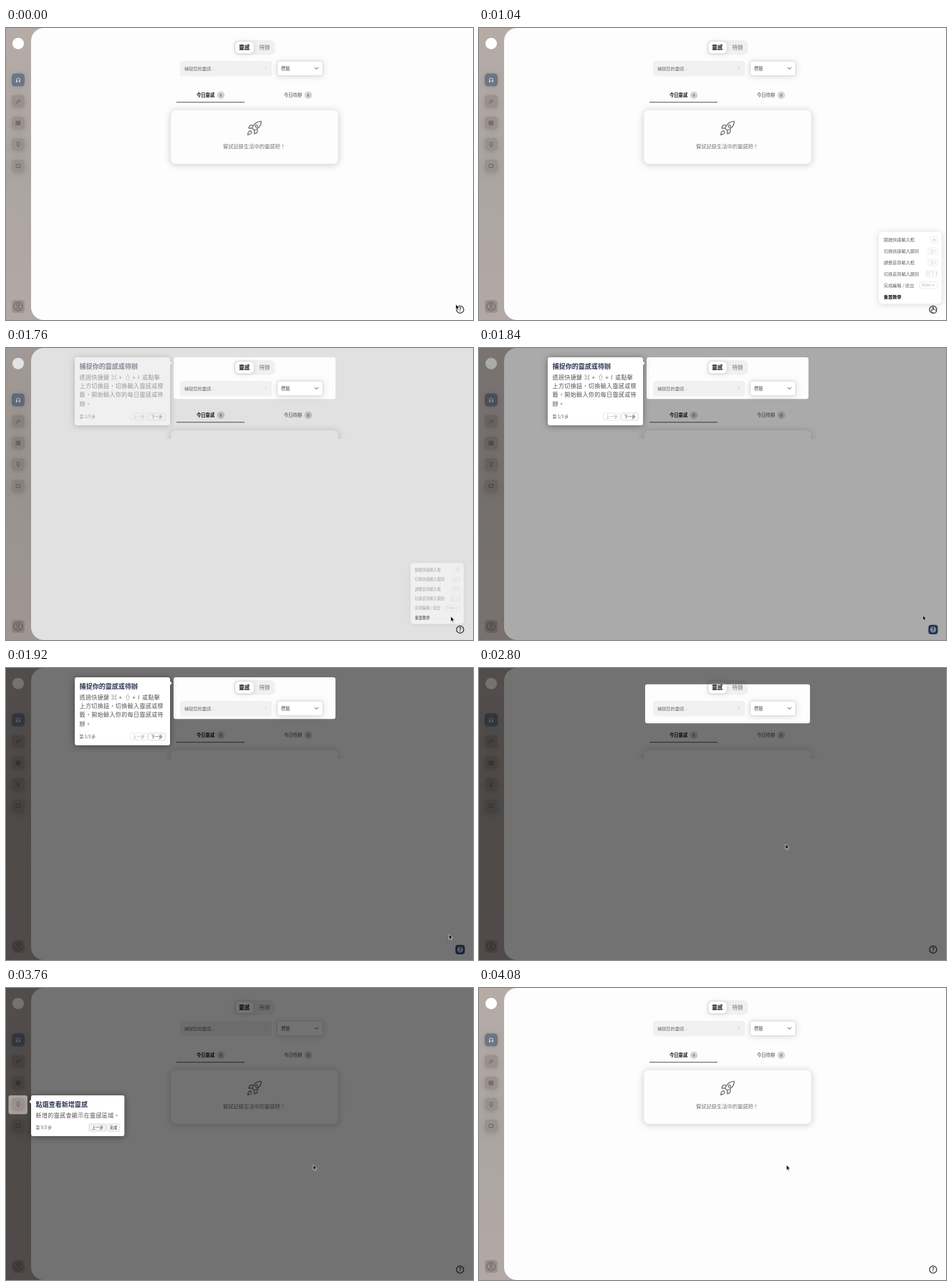
Write an HTML page that moves like this. It is 652x408 px and loops after 4.32 s.

```html
<!DOCTYPE html>
<html lang="zh-Hant">
<head>
<meta charset="utf-8">
<title>靈感導覽</title>
<style>
  html, body { margin: 0; width: 100%; height: 100%; overflow: hidden; background: #fdfdfd; }
  svg { display: block; width: 100vw; height: 100vh; }
  text { font-family: "Noto Sans CJK TC", "Noto Sans TC", "Noto Sans CJK", "DejaVu Sans", sans-serif; }
  .b { font-weight: 700; }
  .line { fill: none; stroke-linecap: round; stroke-linejoin: round; }
  .soft { filter: drop-shadow(0 1px 4px #0002); }
  .pop { filter: drop-shadow(0 1px 5px #0006); }
</style>
</head>
<body>
<svg id="stage" viewBox="0 0 652 408"></svg>
<script>
const LOOP = 4320, STEP = 80, DIM = 0.55;

const text = (x, y, size, fill, str, extra = '') =>
  `<text x="${x}" y="${y}" font-size="${size}" fill="${fill}" ${extra}>${str}</text>`;
const box = (x, y, w, h, r, fill, extra = '') =>
  `<rect x="${x}" y="${y}" width="${w}" height="${h}" rx="${r}" fill="${fill}" ${extra}/>`;
const dot = (x, y, r, fill, extra = '') =>
  `<circle cx="${x}" cy="${y}" r="${r}" fill="${fill}" ${extra}/>`;
const line = (d, color, width, extra = '') =>
  `<path class="line" d="${d}" stroke="${color}" stroke-width="${width}" ${extra}/>`;
const bold = 'class="b"', mid = 'text-anchor="middle"';

// Icons are drawn around 0,0
const icons = [
  'M-2.5 3v-3a2.5 2.5 0 0 1 5 0v3h-1.2v-2.4h1.2M-2.5 .6h1.2v2.4h-1.2',
  'M-2.8 2.2h2M-2.8 0h1.4M-.4-1.6h3.2M.2 .3h2.4',
  'M-2.6-2.6h5.2v5.2h-5.2zM-2.6-.9h5.2M-2.6 .9h5.2M0-.9v3.5',
  'M-1 1.4c0-1-1.2-1.3-1.2-2.6a2.2 2.2 0 0 1 4.4 0c0 1.3-1.2 1.6-1.2 2.6zM-.8 3h1.6',
  'M-2.6-2.3h5.2v4h-1.4v1l-1.2-1h-2.6z'
];

function sidebar() {
  const buttons = icons.map((d, i) => {
    const y = 72.5 + i * 30.1;
    return box(8, y - 9, 18, 18, 4.5, i ? '#9a918d' : '#6c7685', 'class="soft"') +
      line(d, i ? '#5f5855' : '#e4e6ea', 0.8, `transform="translate(17 ${y})"`);
  }).join('');
  return box(0, 0, 70, 408, 0, 'url(#side)') + dot(17, 21.7, 8, '#fff') + buttons +
    box(8, 380, 18, 18, 4.5, '#9a918d') +
    dot(17, 389, 6, 'none', 'stroke="#5f5855" stroke-width=".9"') +
    dot(17, 387.2, 2.1, 'none', 'stroke="#5f5855" stroke-width=".9"') +
    line('M13 393.2c1-2.6 7-2.6 8 0', '#5f5855', 0.9);
}

const tab = (x, label, fill, extra = '') =>
  text(x, 96.4, 6.3, fill, label, extra) + dot(x + 34, 93.8, 5.3, '#dad3d3') +
  text(x + 34, 95.8, 5.4, '#333', '0', mid);

function page() {
  return box(35, 0, 640, 408, 18, '#fdfdfd') +
    box(318, 17, 57.5, 20.5, 6.5, '#f0f0f0') +
    box(320.5, 19.3, 25, 16, 5, '#fff', 'class="soft"') +
    text(332.7, 30.3, 7.5, '#111', '靈感', `${bold} ${mid}`) +
    text(361, 30.3, 7.5, '#707070', '待辦', mid) +
    box(243, 46, 128, 21.5, 4, '#f1f1f1') +
    text(249, 58.8, 6.2, '#666', '捕捉您的靈感...') +
    line('M362.5 54.3v4', '#ccc', 0.8) +
    box(378.5, 46.2, 64, 20.5, 3, '#fff', 'stroke="#d2d2d2" stroke-width=".8" class="soft"') +
    text(384, 58.9, 6.3, '#555', '標籤') +
    line('M431.3 55.4l2.2 2.2 2.2-2.2', '#444', 0.9) +
    tab(266, '今日靈感', '#1b1b1b', bold) + tab(388, '今日待辦', '#444') +
    box(238, 103.1, 95, 1.2, 0, '#66746e') +
    `<g clip-path="url(#cut)">${box(230, 114.5, 234, 75.5, 7, '#fdfdfd',
      'stroke="#e9e9e9" stroke-width=".6" style="filter:drop-shadow(0 1px 5px #0003)"')}</g>` +
    `<g id="content"><g transform="translate(335 128.4) scale(.97)">` +
    line('M4.5 16.5c-1.5 1.26-2 5-2 5s3.74-.5 5-2c.71-.84.7-2.13-.09-2.91a2.18 2.18 0 0 0-2.91-.09z' +
      'M12 15l-3-3a22 22 0 0 1 2-3.95A12.88 12.88 0 0 1 22 2c0 2.72-.78 7.5-6 11a22.35 22.35 0 0 1-4 2z' +
      'M9 12H4s.55-3.03 2-4c1.62-1.08 5 0 5 0M12 15v5s3.03-.55 4-2c1.08-1.62 0-5 0-5', '#777', 1.4) +
    dot(15.2, 9, 1.7, 'none', 'stroke="#777" stroke-width="1.3"') + '</g>' +
    text(303, 168.4, 7.25, '#757575', '嘗試記錄生活中的靈感吧！') + '</g>' +
    box(628, 387.4, 12, 12, 2.5, '#3d66a8', 'id="focus" stroke="#173a78"') +
    dot(634, 393.4, 5, '#fdfdfd', 'id="help" stroke="#2b3442" stroke-width="1.2"') +
    text(634, 396.2, 7.6, '#2b3442', '?', `${bold} ${mid}`);
}

function menu() {
  const rows = [['開啟快速輸入框', 'N', 9], ['切換快速輸入類別', '⌘ I', 13], ['調整首頁輸入框', '⌘ I', 13],
    ['切換首頁輸入類別', '⌘ ⇧ I', 16], ['完成編輯 / 送出', 'Enter ↵', 25], ['重置教學']];
  return box(558, 284.5, 88, 101, 5, '#fff', 'class="soft" stroke="#ececec" stroke-width=".5"') +
    rows.map(([label, key, w], i) => {
      const y = 296 + i * 15.85;
      return text(565, y + 2.3, 6.2, key ? '#666' : '#111', label, key ? '' : bold) + (key
        ? box(640 - w, y - 4.5, w, 9, 2, '#fff', 'stroke="#e2e2e2" stroke-width=".7"') +
          text(640 - w / 2, y + 1.9, 5.2, '#aaa', key, mid) : '');
    }).join('');
}

const button = (x, y, w, label, fill, extra = '') =>
  box(x, y - 5, w, 10, 1.8, '#fff', `stroke="#c9c9c9" stroke-width=".7" ${extra}`) +
  text(x + w / 2, y + 2, 5.4, fill, label, mid);

// Tour steps: highlighted area, popover box, arrow, texts
const tour = [
  { hole: [234, 13, 226, 58.3], pop: [96, 13, 133, 95], arrow: 'M229 18.5l2.6 2.8-2.6 2.8z',
    title: '捕捉你的靈感或待辦',
    lines: ['透過快捷鍵', '上方切換鈕，切換輸入靈感或標', '籤，開始輸入你的每日靈感或待', '辦。'],
    keys: [['⌘', 147], ['+', 157.5], ['⇧', 166], ['+', 176.5], ['I', 184], ['或點擊', 190]], show: 1680 },
  { hole: [220.3, 77, 253.4, 33.8], pop: [220.3, 115, 133, 70], arrow: 'M226.4 115l2.8-2.6 2.8 2.6z',
    title: '查看靈感或待辦', lines: ['透過切換標籤，查看你輸入的每', '日靈感或待辦。'], move: 2690, show: 2920 },
  { hole: [3.5, 150, 26.5, 26.3], pop: [35, 150, 130.3, 57], arrow: 'M35 156l-2.6 2.8 2.6 2.8z',
    title: '點選查看新增靈感', lines: ['新增的靈感會顯示在靈感區域。'], move: 3320, show: 3540 }
];
const TOUR_START = 1720, TOUR_END = 4080;

function popover(s, i) {
  const [x, y, w, h] = s.pop, left = x + 6.6, right = x + w - 6.6, foot = y + h - 12;
  const body = (str, px, n) => text(px, y + 30.6 + n * 12.4, 8, '#555', str, 'letter-spacing=".38"');
  const last = i === 2, nw = last ? 17.5 : 23.5;
  return `<g id="pop${i}" class="pop">` + box(x, y, w, h, 3, '#fff') + `<path d="${s.arrow}" fill="#fff"/>` +
    text(left, y + 16.2, 9.06, '#2d3750', s.title, bold) +
    s.lines.map((str, n) => body(str, left, n)).join('') +
    (s.keys || []).map(([str, px]) => body(str, px, 0)).join('') +
    text(left, foot + 2, 5.7, '#555', `第 ${i + 1}/3 步`) +
    button(right - nw - 25.2, foot, 23.5, '上一步', i ? '#444' : '#999', i ? 'style="fill:#f3f3f3"' : 'stroke-opacity=".6"') +
    button(right - nw, foot, nw, last ? '完成' : '下一步', '#222') + '</g>';
}

const $ = id => document.getElementById(id);
$('stage').innerHTML = `<defs>
  <linearGradient id="side" x2="0" y2="1"><stop stop-color="#b5aca8"/><stop offset=".5" stop-color="#aba5a1"/>
  <stop offset="1" stop-color="#b3a8a5"/></linearGradient>
  <clipPath id="cut"><rect id="cutBox" x="215" y="100" width="264" height="110"/></clipPath></defs>` +
  sidebar() + page() + '<path id="shade" fill-rule="evenodd"/>' +
  `<g id="menu">${menu()}</g>` + tour.map(popover).join('') +
  `<g id="cursor"><path id="arrow" d="M0 0v7.2l1.6-1.5 1.1 2.5 1.2-.5-1.1-2.5h2.2z" fill="#000" stroke="#fff" stroke-width=".6"/>
  <path id="hand" d="M0 .6c0-1 1.3-1 1.3 0v2.6l3 .6c.8.2 1 .7.9 1.4l-.5 2.8h-4l-2.6-3c-.4-.6.3-1.2.9-.8l1 .7z"
  fill="#fff" stroke="#111" stroke-width=".7"/></g>`;

const clamp = v => Math.min(1, Math.max(0, v));
const ramp = (t, a, b) => clamp((t - a) / (b - a));
const ease = p => p < 0.5 ? 2 * p * p : 1 - 2 * (1 - p) * (1 - p);
const lerp = (a, b, p) => a + (b - a) * p;
const show = (id, opacity) => {
  $(id).style.display = opacity > 0 ? '' : 'none';
  $(id).style.opacity = opacity;
};

// time, x, y
const path = [[0, 628, 386], [80, 628, 386], [160, 632, 389], [320, 632, 389], [800, 633, 390], [1040, 633, 390],
  [1360, 621, 375], [1760, 621, 375], [1920, 618.5, 372], [2400, 428, 246], [3200, 428, 246], [3760, 429, 247], [LOOP, 429.5, 247.5]];

function cursorAt(t) {
  const i = path.findIndex(k => k[0] > t), a = path[i - 1], b = path[i];
  const p = ease(ramp(t, a[0], b[0]));
  return [lerp(a[1], b[1], p), lerp(a[2], b[2], p)];
}

function holeAt(t) {
  return tour.slice(1).reduce((from, s) => {
    const p = ease(ramp(t, s.move, s.move + 400));
    return from.map((v, i) => lerp(v, s.hole[i], p));
  }, tour[0].hole);
}

function draw(t) {
  const touring = t < TOUR_END;
  const [x, y, w, h] = holeAt(t), r = 3;
  $('shade').setAttribute('d', `M0 0H652V408H0ZM${x + r} ${y}h${w - 2 * r}a${r} ${r} 0 0 1 ${r} ${r}v${h - 2 * r}` +
    `a${r} ${r} 0 0 1 ${-r} ${r}h${2 * r - w}a${r} ${r} 0 0 1 ${-r} ${-r}v${2 * r - h}a${r} ${r} 0 0 1 ${r} ${-r}z`);
  show('shade', touring ? DIM * ramp(t, TOUR_START, 1920) : 0);
  tour.forEach((s, i) => {
    const end = i < 2 ? tour[i + 1].move : TOUR_END;
    show('pop' + i, t < end ? ease(ramp(t, s.show, s.show + 160)) : 0);
  });

  const open = ramp(t, 840, 1000), close = ramp(t, 1680, 1840);
  const scale = lerp(0.8, 1, ease(open)) - 0.31 * close;
  $('menu').setAttribute('transform', `translate(602 385.5) scale(${scale}) translate(-602 -385.5)`);
  show('menu', open * (1 - close));

  const hidden = t >= 1680 && t < 3360;
  $('cutBox').setAttribute('height', hidden ? 27 : 110);
  show('content', hidden ? 0 : 1);
  const focused = t >= 1840 && t < 2720;
  show('focus', focused ? 1 : 0);
  $('help').setAttribute('fill', focused ? '#b9cdf0' : '#fdfdfd');

  const hand = t >= 160 && t < 1120;
  show('hand', hand ? 1 : 0);
  show('arrow', hand ? 0 : 1);
  $('cursor').setAttribute('transform', `translate(${cursorAt(t)})`);
}

function frame() {
  draw(Math.floor(performance.now() % LOOP / STEP) * STEP);
  requestAnimationFrame(frame);
}
frame();
</script>
</body>
</html>
```
